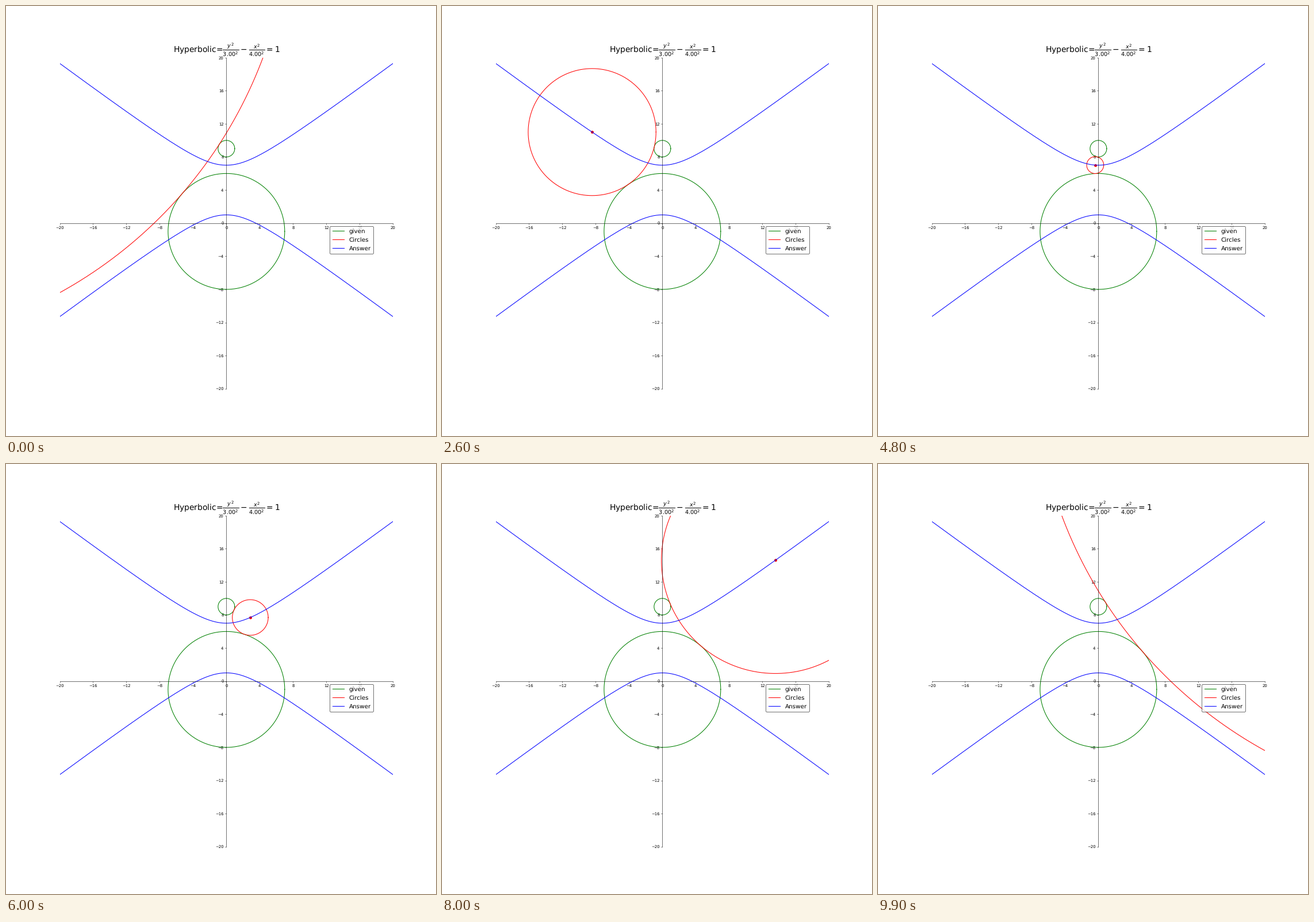
Recreate the animation shown at these times as a matplotlib script. Size 748 by 748 pixels, loop 10000 ms.

```python
import numpy as np
import matplotlib.pyplot as plt
from matplotlib.animation import FuncAnimation
from matplotlib.ticker import MultipleLocator

plt.rcParams["text.hinting"] = "none"

SIZE, INCHES = 748, 15
FRAMES, INTERVAL = 100, 100
LIMIT = 20

# Hyperbola (y - MID)^2 / A^2 - x^2 / B^2 = 1, foci at the centres of the given circles
A, B, MID = 3, 4, 4
C = np.hypot(A, B)
R_SMALL, R_BIG = 1, 7

theta = np.linspace(0, 2 * np.pi, 721)
params = np.linspace(-np.pi, np.pi, FRAMES)


def circle(x, y, r):
    return x + r * np.cos(theta), y + r * np.sin(theta)


fig, ax = plt.subplots(figsize=(INCHES, INCHES), dpi=SIZE / INCHES)
ax.set_xlim(-LIMIT, LIMIT)
ax.set_ylim(-LIMIT, LIMIT)

for side in ("top", "right"):
    ax.spines[side].set_visible(False)
for side in ("left", "bottom"):
    ax.spines[side].set_position(("data", 0))
for axis in (ax.xaxis, ax.yaxis):
    axis.set_major_locator(MultipleLocator(4))
ax.xaxis.set_ticks_position("bottom")
ax.yaxis.set_ticks_position("left")

ax.plot(*circle(0, MID + C, R_SMALL), color="green", label="given")
ax.plot(*circle(0, MID - C, R_BIG), color="green")
ring, = ax.plot([], [], color="red", label="Circles")
dot, = ax.plot([], [], "ro")

x = np.linspace(-LIMIT, LIMIT, 401)
branch = A * np.sqrt(1 + (x / B) ** 2)
ax.plot(x, MID + branch, color="blue", label="Answer")
ax.plot(x, MID - branch, color="blue")

ax.set_title(
    rf"Hyperbolic=$\frac{{y^2}}{{{A:.2f}^2}}-\frac{{x^2}}{{{B:.2f}^2}}=1$",
    fontsize=20,
)
ax.legend(loc="upper right", bbox_to_anchor=(0.95, 0.5), fontsize=15,
          edgecolor="black")


def update(i):
    t = params[i]
    cx, cy = B * np.sinh(t), MID + A * np.cosh(t)
    r = np.hypot(cx, cy - (MID + C)) - R_SMALL
    ring.set_data(*circle(cx, cy, r))
    dot.set_data([cx], [cy])
    return ring, dot


anim = FuncAnimation(fig, update, frames=FRAMES, interval=INTERVAL, repeat=True)
plt.show()
```
